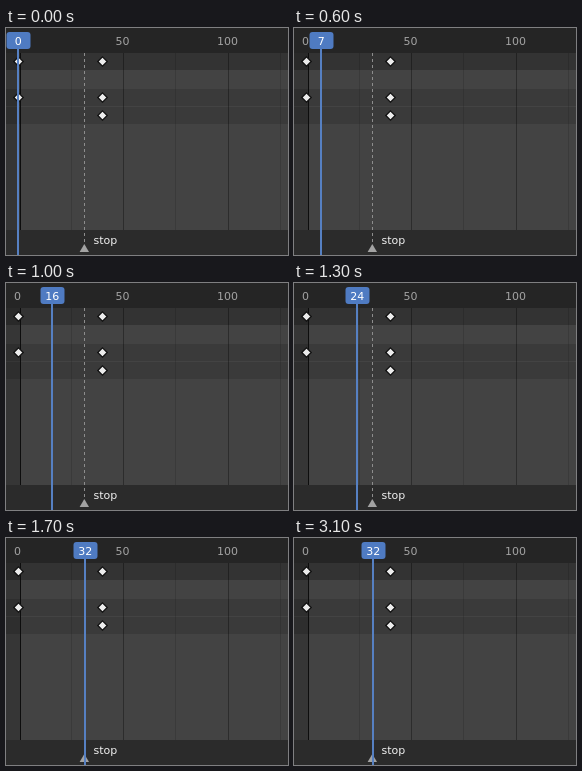
An HTML page for the animation above (3.4 s loop, 282 by 227 pixels).

```html
<!DOCTYPE html>
<html lang="en">
<head>
<meta charset="utf-8">
<title>Timeline playhead</title>
<style>
  html, body { margin: 0; width: 100%; height: 100%; overflow: hidden; background: #434343; }
  svg { display: block; width: 100%; height: 100%; }
  text { font: 11px "DejaVu Sans", sans-serif; }
  .ruler { fill: #a3a3a3; text-anchor: middle; }
  .key { fill: #ececec; stroke: #0c0c0c; stroke-width: 1.2; }
</style>
</head>
<body>
<svg viewBox="0 0 282 227">
  <rect width="282" height="227" fill="#434343"/>
  <g shape-rendering="crispEdges">
    <rect y="25" width="282" height="17" fill="#333333"/>
    <rect y="61" width="282" height="17" fill="#3a3a3a"/>
    <rect y="79" width="282" height="17" fill="#3a3a3a"/>
    <rect y="25" width="14" height="177" fill="#000" opacity=".2"/>
    <g id="grid"></g>
    <rect x="14" y="25" width="1" height="177" fill="#0d0d0d"/>
    <rect width="282" height="25" fill="#252525"/>
    <rect y="202" width="282" height="25" fill="#2b2b2b"/>
    <path d="M78.5 25V216" stroke="#8d8d8d" stroke-dasharray="3 3"/>
  </g>
  <path d="M78.3 216L83 224H73.6Z" fill="#a3a3a3"/>
  <text x="87.5" y="216" fill="#f0f0f0">stop</text>
  <text class="ruler" x="11.5" y="17">0</text>
  <text class="ruler" x="116.5" y="17">50</text>
  <text class="ruler" x="221.5" y="17">100</text>
  <g id="keys"></g>
  <g id="head">
    <rect x="-1" y="20" width="2" height="207" fill="#5680c2"/>
    <rect x="-11.5" y="4" width="24" height="17" rx="3" fill="#4f7bc2"/>
    <text id="num" x="0.3" y="17" fill="#fff" text-anchor="middle"></text>
  </g>
  <path id="cursor" d="M0 0V14.5L3.4 11.4L5.7 16.6L8.4 15.4L6.1 10.3H10.8Z"
        fill="#111" stroke="#fff" stroke-width="1.3" stroke-linejoin="round"/>
</svg>
<script>
  const LOOP = 3400, STEP = 100, STOP = 32;
  const $ = id => document.getElementById(id);

  $("grid").innerHTML = [65, 117, 169, 222, 274].map((x, i) =>
    `<rect x="${x}" y="25" width="1" height="177" fill="#000" opacity="${i % 2 ? .35 : .13}"/>`).join("");

  $("keys").innerHTML = [[12.5, 33.5], [96.5, 33.5], [12.5, 69.5], [96.5, 69.5], [96.5, 87.5]].map(([x, y]) =>
    `<path class="key" d="M${x} ${y - 4.7}l4.7 4.7l-4.7 4.7l-4.7 -4.7Z"/>`).join("");

  // Pointer tip while it dips in from the top edge
  const pointer = [[27, -11.5], [34, -4], [38, -2.5], [36, -9]];

  function draw(time) {
    const tick = Math.floor((time % LOOP) / STEP);
    const played = Math.max(0, tick - 3);
    const frame = played ? Math.min(STOP, Math.floor(2.45 * played - .34)) : 0;
    $("head").setAttribute("transform", `translate(${Math.round(12.2 + 2.1 * frame)} 0)`);
    $("num").textContent = frame;

    const tip = pointer[tick - 27];
    $("cursor").setAttribute("visibility", tip ? "visible" : "hidden");
    if (tip) $("cursor").setAttribute("transform", `translate(${tip})`);
  }

  const start = performance.now();
  function loop() {
    draw(performance.now() - start);
    requestAnimationFrame(loop);
  }
  loop();
</script>
</body>
</html>
```
